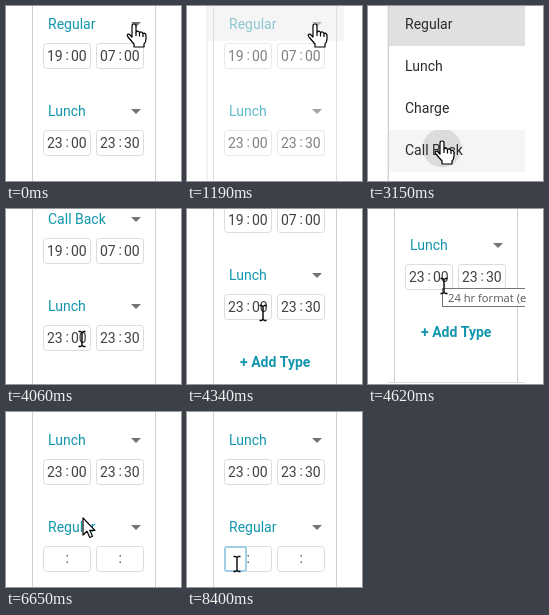
Recreate the animation shown at these times as an HTML page with a canvas. Size 175 by 175 pixels, loop 8.54 s.

```html
<!DOCTYPE html>
<html lang="en">
<head>
<meta charset="utf-8">
<title>Shift types</title>
<style>
html, body { margin: 0; width: 100%; height: 100%; overflow: hidden; background: #fff; }
canvas { display: block; }
</style>
</head>
<body>
<canvas id="stage" width="175" height="175"></canvas>
<script>
const ctx = document.getElementById('stage').getContext('2d');
const LOOP = 8540, STEP = 70;
const TEAL = '#1296ad', INK = '#424242';
const ITEMS = ['Regular', 'Lunch', 'Charge', 'Call Back'];

// Pointer tip: time, x, y on the stage
const PATH = [
  [0, 128, 18], [2170, 128, 18], [3010, 74, 135], [3640, 74, 135],
  [3710, 76, 146], [3990, 76, 146], [4060, 76, 130], [4620, 76, 77],
  [4690, 76, 70], [4900, 93, 106], [5110, 77, 106], [6930, 77, 106],
  [7560, 62, 152], [7840, 57, 147], [8260, 57, 147], [8400, 50, 152], [LOOP, 50, 152]
];

const HAND = new Path2D('M-2 2Q-2 0 0 0Q2 0 2 2V8Q4 6 5.5 8.5Q7.5 7 9 9.5Q11 8.5 12 11V15Q12 18 10 20V23H0V20L-6 13Q-8 10 -5 10L-2 13Z');
const FINGERS = new Path2D('M2 8V12M5.5 8.5V12.5M9 9.5V13');
const ARROW = new Path2D('M0 0V17L4 13.3L6.8 19.5L9.5 18.3L6.8 12.3H12Z');
const BEAM = new Path2D('M-3.5 -7.5H-1.5L0 -6.5L1.5 -7.5H3.5M0 -6.5V6.5M-3.5 7.5H-1.5L0 6.5L1.5 7.5H3.5');

const ramp = (t, a, b) => Math.min(1, Math.max(0, (t - a) / (b - a)));

function pointerAt(t) {
  const i = Math.max(1, PATH.findIndex(k => k[0] > t));
  const [a, b] = [PATH[i - 1], PATH[i]];
  const p = ramp(t, a[0], b[0]);
  return [1, 2].map(n => Math.round(a[n] + (b[n] - a[n]) * p));
}

function text(s, x, y, color = INK, font = '14px Roboto, sans-serif') {
  ctx.font = font;
  ctx.fillStyle = color;
  ctx.fillText(s, x, y);
}

function rect(x, y, w, h, color) {
  ctx.fillStyle = color;
  ctx.fillRect(x, y, w, h);
}

function outline(x, y, w, h, color, r = 3) {
  ctx.beginPath();
  ctx.roundRect(x, y, w, h, r);
  ctx.strokeStyle = color;
  ctx.stroke();
}

function timeBox(x, y, value) {
  outline(x + .5, y + .5, 47, 25, '#dcdcdc');
  const [h, m] = value.split(':');
  text(h, x + 4, y + 18);
  text(':', x + 22.5, y + 17);
  text(m, x + 28, y + 18);
}

function shiftRow(y, label, from, to) {
  text(label, 42, y + 5, TEAL);
  ctx.fillStyle = '#757575';
  ctx.beginPath();
  ctx.moveTo(125, y - 2);
  ctx.lineTo(135, y - 2);
  ctx.lineTo(130, y + 3);
  ctx.fill();
  timeBox(37, y + 19, from);
  timeBox(90, y + 19, to);
}

function drawPage(t) {
  const pan = Math.round(77 * ramp(t, 3990, 4690));
  const added = ramp(t, 6020, 6300);
  const bottom = t < 6020 ? 242 - pan : 175;
  rect(26, 0, 1, bottom, '#cfcfcf');
  rect(149, 0, 1, bottom, '#cfcfcf');
  if (bottom < 175) rect(20, bottom, 137, 1, '#dedede');

  shiftRow(18 - pan, t < 3710 ? 'Regular' : 'Call Back', '19:00', '07:00');
  shiftRow(105 - pan, 'Lunch', '23:00', '23:30');
  ctx.globalAlpha = 1 - added;
  text('+ Add Type', 53, 197 - pan, TEAL, 'bold 14px Roboto, sans-serif');
  ctx.globalAlpha = added;
  if (added) shiftRow(192 - pan, 'Regular', ':', ':');
  ctx.globalAlpha = 1;

  if (t >= 7630) {
    ctx.lineWidth = 2;
    outline(38, 135, 21, 24, '#a3cfe6', 2);
    ctx.lineWidth = 1;
  }
  if (t >= 4480 && t < 4760) {
    const y = 148 - pan;
    rect(74, y, 83, 19, '#767676');
    rect(75, y + 1, 82, 17, '#fff');
    text('24 hr format (e', 80, y + 13.5, '#575757', '11.2px "Open Sans", sans-serif');
  }
}

function drawMenu(t, pointerY) {
  const chosen = t < 3500 ? 0 : 3;
  const hover = Math.floor((pointerY + 2) / 42);
  const open = ramp(t, 1120, 1330);
  ctx.save();
  ctx.globalAlpha = open;
  ctx.scale(1, .8 + .2 * open);
  rect(19, 0, 1, 220, '#ececec');
  rect(20, 0, 1, 220, '#d2d2d2');
  rect(21, 0, 136, 220, '#fff');
  ITEMS.forEach((name, i) => {
    const y = i * 42 - 2;
    if (i === chosen) rect(21, y, 136, 42, '#e0e0e0');
    else if (i === hover) rect(21, y, 136, 42, '#f5f5f5');
    if (i === 3 && t >= 3080 && t < 3500) {
      ctx.save();
      ctx.beginPath();
      ctx.rect(21, y, 136, 42);
      ctx.clip();
      ctx.beginPath();
      ctx.arc(74, 142, 100 * ramp(t, 3040, 3290) ** 2, 0, 7);
      ctx.fillStyle = 'rgba(0,0,0,.1)';
      ctx.fill();
      ctx.restore();
    }
    ctx.globalAlpha = ramp(t, 1190, 1470);
    text(name, 37, y + 25, '#2b2b2b');
    ctx.globalAlpha = open;
  });
  ctx.restore();
}

function drawPointer(t, x, y) {
  const beam = (t >= 3710 && t < 4760) || t >= 7630;
  const arrow = t >= 6160 && t < 7630;
  ctx.save();
  ctx.translate(x, y);
  ctx.strokeStyle = '#000';
  ctx.lineJoin = 'round';
  if (beam) {
    ctx.lineWidth = 1.4;
    ctx.stroke(BEAM);
  } else {
    const shape = arrow ? ARROW : HAND;
    ctx.lineWidth = 1.2;
    ctx.fillStyle = '#fff';
    ctx.fill(shape);
    ctx.stroke(shape);
    if (!arrow) ctx.stroke(FINGERS);
  }
  ctx.restore();
}

function draw(now) {
  const t = Math.floor((now % LOOP) / STEP) * STEP;
  const [x, y] = pointerAt(t);
  rect(0, 0, 175, 175, '#fff');
  drawPage(t);
  if (t >= 1190 && t < 3710) drawMenu(t, y);
  drawPointer(t, x, y);
}

const start = performance.now();
function tick() {
  draw(performance.now() - start);
  requestAnimationFrame(tick);
}
tick();
</script>
</body>
</html>
```
